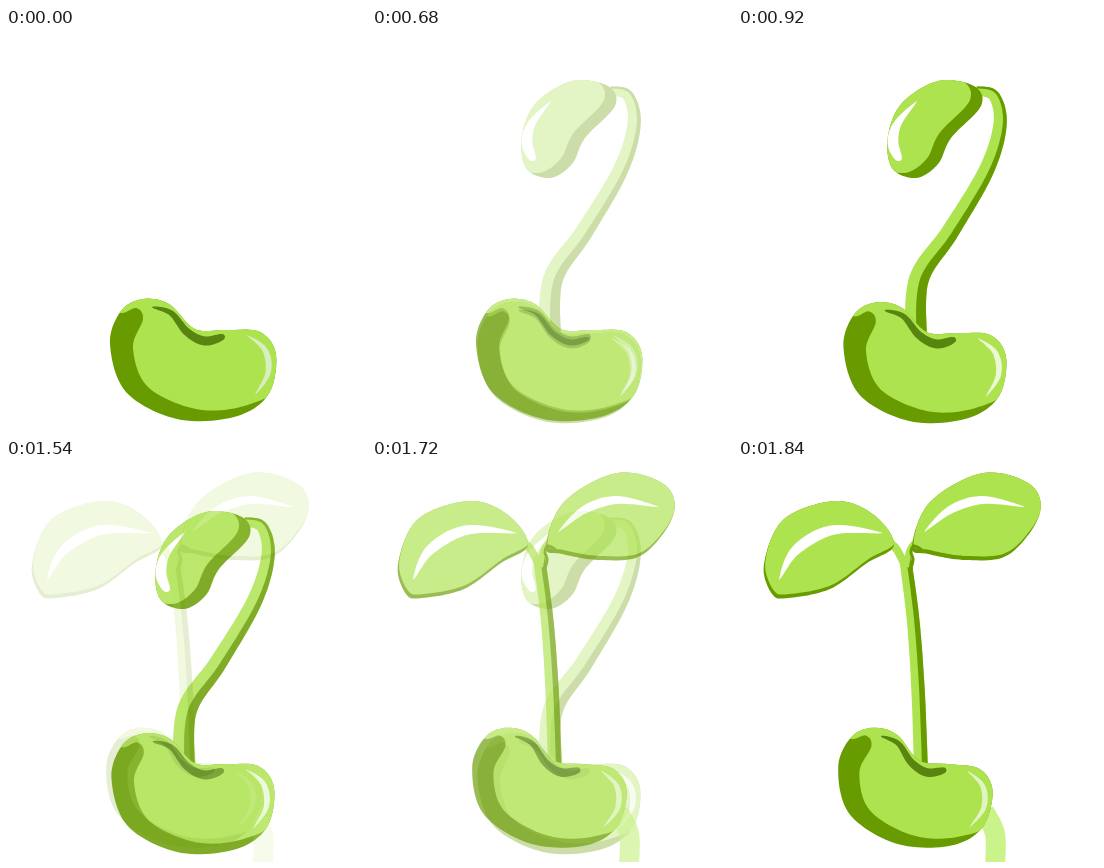
Animation, 360 px wide and 403 px high, one loop 2.46 s. Source, as an HTML page:

```html
<!DOCTYPE html>
<html lang="en">
<head>
<meta charset="utf-8">
<title>Sprouting bean</title>
<style>
  html, body { margin: 0; width: 100%; height: 100%; overflow: hidden; background: #fff; }
  svg { display: block; width: 100%; height: 100%; }
</style>
</head>
<body>
<svg id="stage" viewBox="0 0 360 403"></svg>
<script>
const LIGHT = '#aee350', DARK = '#689b00', FOLD = '#578510', ROOT = '#cbf38c';
const LOOP = 2460, STEP = 60, STEPS = 6, FADES = [620, 1540];
const DETAIL = 12;
let clips = 0;

// Catmull-Rom spline through key points, as a dense list of points.
function spline(text, closed) {
  const keys = text.split(', ').map(p => p.split(' ').map(Number));
  const n = keys.length, spans = closed ? n : n - 1, out = [];
  const key = i => keys[closed ? (i + n) % n : Math.max(0, Math.min(n - 1, i))];
  for (let s = 0; s <= spans * DETAIL; s++) {
    const i = Math.min(spans - 1, Math.floor(s / DETAIL)), u = s / DETAIL - i;
    const [a, b, c, d] = [-1, 0, 1, 2].map(k => key(i + k));
    out.push([0, 1].map(k => b[k] + u / 2 * (c[k] - a[k] +
      u * (2 * a[k] - 5 * b[k] + 4 * c[k] - d[k] + u * (3 * (b[k] - c[k]) + d[k] - a[k])))));
  }
  return out;
}

const toPath = pts => 'M' + pts.map(p => p.map(v => v.toFixed(1))).join('L') + 'Z';
const blob = keys => toPath(spline(keys, true));

// Band along a spine; inner and outer are offsets from it, by position 0..1.
function ribbon(keys, inner, outer) {
  const pts = spline(keys), last = pts.length - 1;
  const side = offset => pts.map(([x, y], i) => {
    const a = pts[Math.max(0, i - 1)], b = pts[Math.min(last, i + 1)];
    const dx = b[0] - a[0], dy = b[1] - a[1], k = offset(i / last) / Math.hypot(dx, dy);
    return [x + dy * k, y - dx * k];
  });
  return toPath([...side(inner), ...side(outer).reverse()]);
}

const fill = (d, color) => `<path d="${d}" fill="${color}"/>`;
const place = (art, transform) => `<g transform="${transform}">${art}</g>`;
const band = (keys, width, color) => fill(ribbon(keys, t => -width(t) / 2, t => width(t) / 2), color);
const crescent = (keys, width, color) => band(keys, t => width * Math.sin(Math.PI * t), color);

// Light band with shade along its outer side, starting at a share of the width.
const shadedBand = (keys, width, shade) => band(keys, width, LIGHT) +
  fill(ribbon(keys, t => width(t) * shade(t), t => width(t) / 2), DARK);

// Dark silhouette with a lit area clipped to it.
function shaded(outline, lit) {
  const id = 'clip' + clips++;
  return `<clipPath id="${id}"><path d="${outline}"/></clipPath>` +
    fill(outline, DARK) + `<g clip-path="url(#${id})">${lit}</g>`;
}

// The lit area is the same shape, moved away from the shade.
function shifted(keys, dx, dy) {
  const d = blob(keys);
  return shaded(d, place(fill(d, LIGHT), `translate(${dx} ${dy})`));
}

function bean(shine) {
  const outline = blob('137 271, 163 276, 189 301, 220 302, 254 304, 270 327, 262 367, 228 389, 171 391, 120 364, 104 316, 115 283');
  const lit = blob('112 284, 130 280, 137 291, 127 320, 142 359, 190 381, 238 378, 278 356, 310 300, 200 230, 90 255');
  return shaded(outline, fill(lit, LIGHT)) +
    band('146 279, 165 285, 181 304, 199 313, 219 308', t => 11 * Math.sqrt(t * (1 - t ** 8)), FOLD) +
    crescent('241 307, 259 322, 262 345, 249 367', 6, shine);
}

function hookedSprout() {
  const stem = shadedBand('238 63, 256 68, 262 97, 248 143, 212 204, 181 251, 178 310',
    t => 9 + 13 * t, t => 0.3 - 0.3 * t);
  const head = shifted('150 108, 164 75, 200 53, 236 58, 243 78, 213 110, 200 136, 178 150, 154 140', -11.5, -5);
  const glint = band('179 73, 160 95, 155 115, 162 133', t => 28 * t * Math.sqrt(1 - t), '#fff');
  return stem + head + glint + place(bean('#eaf8d6'), 'translate(3.5 6.7) scale(.98 .988)');
}

function seedling() {
  const root = band('246 352, 257 375, 257 408', () => 20, ROOT);
  const stem = shadedBand('167 98, 175 160, 180 230, 183 310', t => 12 + 2 * t, () => 0.08);
  const petioles = band('143 82, 156 87, 167 106', () => 8, LIGHT) +
    band('182 78, 172 90, 168 108', () => 6, LIGHT);
  const leaves =
    shifted('34 135, 26 105, 46 60, 98 42, 136 56, 156 86, 129 104, 92 130, 50 139', 1.5, -4) +
    shifted('174 88, 192 43, 245 14, 293 26, 301 57, 270 96, 228 101, 190 95', 1.5, -4);
  const veins = crescent('41 121, 58 91, 95 71, 145 74', 11, '#fff') +
    crescent('186 73, 212 51, 245 41, 287 48', 9, '#fff');
  const crease = band('184 91, 176 87, 173 93, 175 101, 172 112', () => 3, DARK);
  return root + stem + petioles + leaves + veins + crease +
    place(bean('#e0f5c2'), 'translate(142.8 277) rotate(5.4) scale(.94) translate(-146 -279)');
}

const stage = document.getElementById('stage');
stage.innerHTML = [bean('#d9eec0'), hookedSprout(), seedling()]
  .map(art => `<g class="layer">${art}</g>`).join('');
const layers = stage.querySelectorAll('.layer');

function fade(t, start) {
  const n = Math.floor((t - start) / STEP) + 1;
  return Math.max(0, Math.min(1, n / STEPS));
}

function draw(t) {
  const [grow, open] = FADES.map(start => fade(t, start));
  [1 - grow, grow * (1 - open), open].forEach((a, i) => {
    layers[i].style.opacity = a;
  });
}

const begin = performance.now();
function tick() {
  draw((performance.now() - begin) % LOOP);
  requestAnimationFrame(tick);
}
tick();
</script>
</body>
</html>
```
